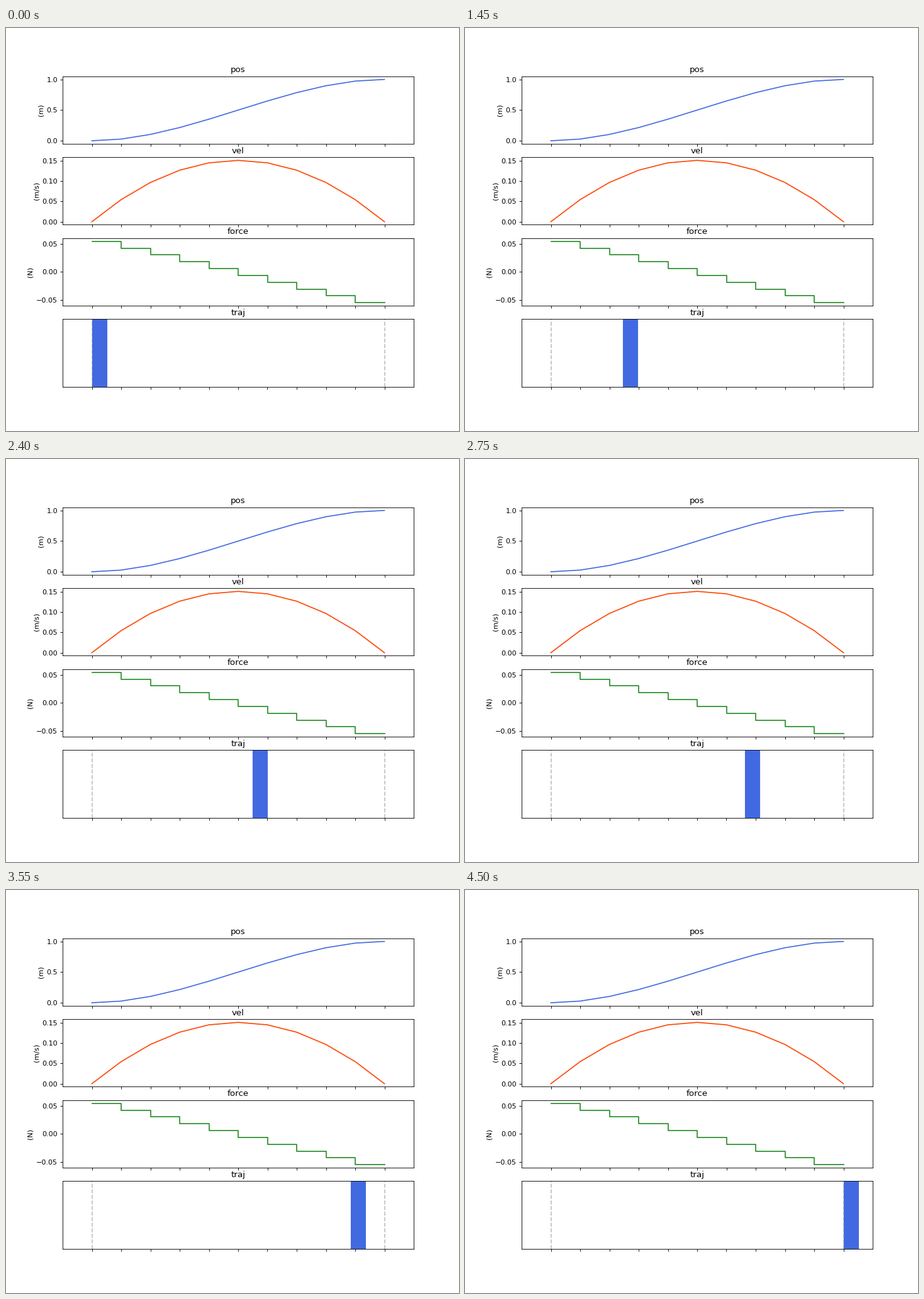
Recreate the animation shown at these times as a matplotlib script. Size 720 by 640 pixels, loop 5 s.

```python
import numpy as np
import matplotlib.pyplot as plt
from matplotlib.animation import FuncAnimation
from matplotlib.patches import Rectangle

STEPS = 10        # control intervals
SUB = 9           # drawn frames per interval
FRAMES = 100      # motion plus a final hold
WIDTH = 0.05
EPS = 1e-7        # keeps half-pixel edges rounding the same way

# Least-effort push of a unit mass from 0 to 1, starting and ending at rest
force = (STEPS - 1 - 2 * np.arange(STEPS)) / 165
vel = np.concatenate([[0], np.cumsum(force)])
pos = np.concatenate([[0], np.cumsum(vel[:-1] + force / 2)])
t = np.arange(STEPS + 1)

plt.rcParams["font.family"] = "DejaVu Sans"
fig, axes = plt.subplots(4, 1, figsize=(9, 8), dpi=80)


def style(ax, title, unit, yticks):
    ax.set_title(title)
    ax.set_ylabel(unit)
    ax.set_yticks(yticks)
    ax.set_xlim(-1, STEPS + 1)
    ax.set_xticks(t)
    ax.tick_params(labelbottom=False)


axes[0].plot(t, pos, color="royalblue")
style(axes[0], "pos", "(m)", [0, 0.5, 1])

axes[1].plot(t, vel, color="orangered")
style(axes[1], "vel", "(m/s)", [0, 0.05, 0.1, 0.15])

axes[2].step(t, np.append(force, force[-1]), where="post", color="forestgreen")
style(axes[2], "force", "(N)", [-0.05, 0, 0.05])

track = axes[3]
style(track, "traj", "", [])
track.set_xlim(-0.1, 1.1)
track.set_xticks(t / STEPS)
track.set_ylim(0, 1)
for x in (0, 1):
    track.axvline(x + EPS, color="gray", linestyle="--", alpha=0.5)
block = track.add_patch(Rectangle((EPS, 0), WIDTH, 1, color="royalblue"))


def update(i):
    now = min(i / SUB, STEPS)
    block.set_x(np.interp(now, t, pos) + EPS)
    return [block]


anim = FuncAnimation(fig, update, frames=FRAMES, interval=50,
                     init_func=lambda: update(0), repeat=True, repeat_delay=0)
plt.show()
```
